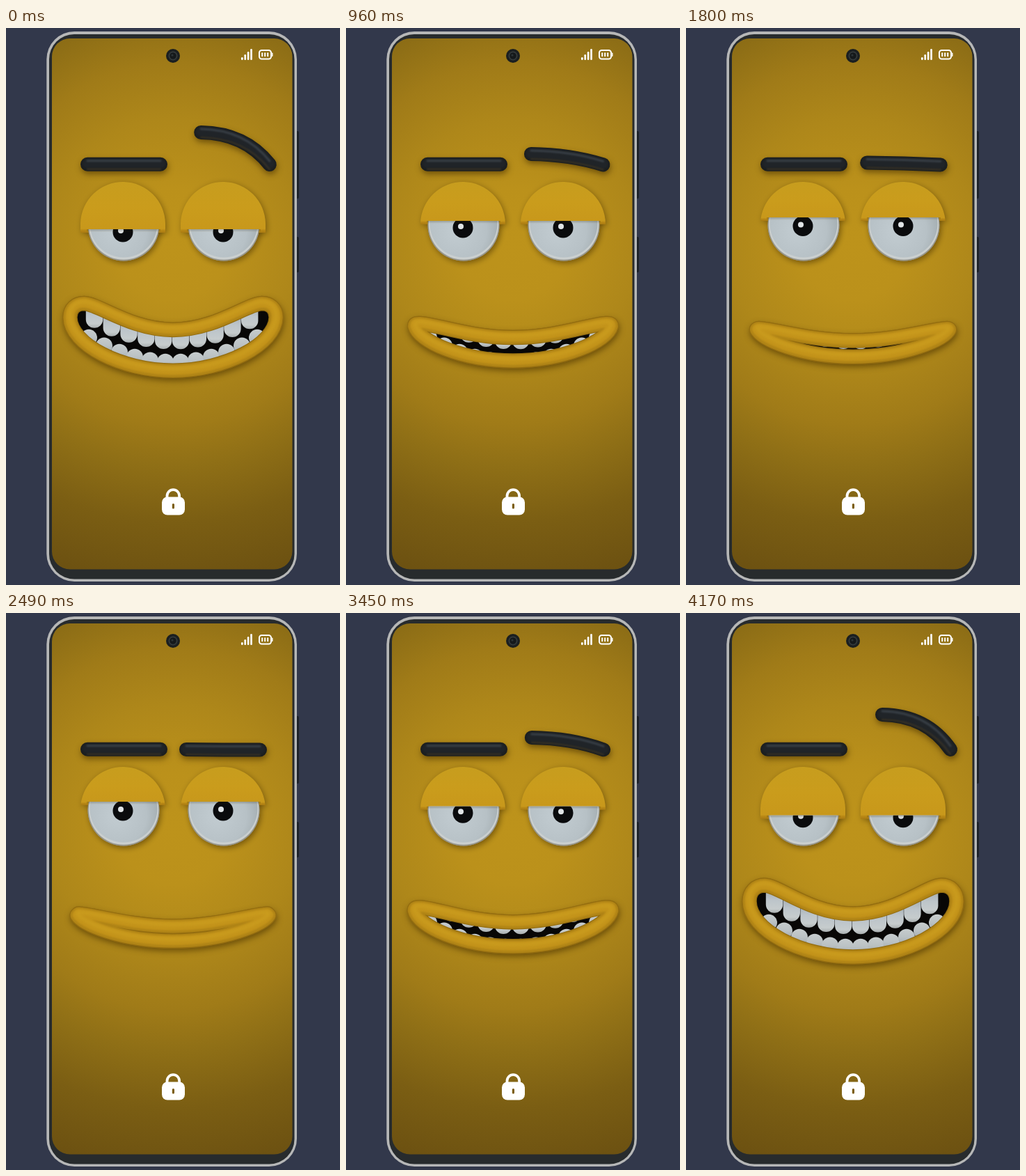
An HTML page with a canvas for the animation above (4200 ms loop, 480x800 px).

```html
<!DOCTYPE html>
<html lang="en">
<head>
<meta charset="utf-8">
<title>Smirking lock screen</title>
<style>
html, body { margin: 0; width: 100%; height: 100%; overflow: hidden; background: #32384b; }
canvas { display: block; width: 480px; height: 800px; }
</style>
</head>
<body>
<canvas id="stage" width="480" height="800"></canvas>
<script>
const ctx = document.getElementById('stage').getContext('2d');
const LOOP = 4200, STEP = 30;

// [time in ms, how far the grin is open]
const GRIN = [
  [0, .92], [250, .9], [480, .82], [720, .58], [960, .3], [1200, .16], [1500, .09],
  [1800, .05], [2490, 0], [2900, .01], [3240, .08], [3450, .34], [3620, .7],
  [3810, .92], [4170, 1]
];

const mix = (a, b, k) => a + (b - a) * k;
const mixPt = (a, b, k) => a.map((v, i) => mix(v, b[i], k));

// Monotone cubic interpolation through the table
const rise = i => (GRIN[i + 1][1] - GRIN[i][1]) / (GRIN[i + 1][0] - GRIN[i][0]);
function slope(i) {
  if (i === 0 || i === GRIN.length - 1) return 0;
  const a = rise(i - 1), b = rise(i);
  return a * b > 0 ? 2 * a * b / (a + b) : 0;
}
function grinAt(t) {
  const last = GRIN.length - 1;
  if (t >= GRIN[last][0]) return GRIN[last][1];
  let i = 0;
  while (t >= GRIN[i + 1][0]) i++;
  const [t0, p0] = GRIN[i], [t1, p1] = GRIN[i + 1];
  const h = t1 - t0, u = (t - t0) / h, v = 1 - u;
  return p0 * (1 + 2 * u) * v * v + p1 * u * u * (3 - 2 * u)
    + h * u * v * (slope(i) * v - slope(i + 1) * u);
}

function gradient(g, ...stops) {
  for (const [at, color] of stops) g.addColorStop(at, color);
  return g;
}
const vertical = (y0, y1, ...stops) => gradient(ctx.createLinearGradient(0, y0, 0, y1), ...stops);
const radial = (x, y, r0, r1, ...stops) =>
  gradient(ctx.createRadialGradient(x, y, r0, x, y, r1), ...stops);

function shadow(color, blur, dx, dy) {
  ctx.shadowColor = color;
  ctx.shadowBlur = blur;
  ctx.shadowOffsetX = dx;
  ctx.shadowOffsetY = dy;
}
const noShadow = () => shadow('transparent', 0, 0, 0);

function roundBox(x0, y0, x1, y1, r, color) {
  ctx.beginPath();
  ctx.roundRect(x0, y0, x1 - x0, y1 - y0, r);
  ctx.fillStyle = color;
  ctx.fill();
}
function disc(x, y, r, color) {
  ctx.beginPath();
  ctx.arc(x, y, r, 0, 7);
  ctx.fillStyle = color;
  ctx.fill();
}
function line(path, width, color, dy = 0, blur = 0) {
  ctx.save();
  ctx.translate(0, dy);
  if (blur) ctx.filter = `blur(${blur}px)`;
  ctx.lineWidth = width;
  ctx.strokeStyle = color;
  ctx.stroke(path);
  ctx.restore();
}

function phone() {
  ctx.fillStyle = '#32384b';
  ctx.fillRect(0, 0, 480, 800);
  roundBox(414, 148, 421, 245, 2, '#1d2229');
  roundBox(414, 300, 421, 351, 2, '#1d2229');
  roundBox(58.3, 5, 418, 795, 40, '#b6b7b7');
  roundBox(62, 9, 414.5, 791.5, 36, '#272b2d');
}

function wallpaper() {
  ctx.fillStyle = radial(240, 310, 0, 500, [0, '#bd931b'], [.16, '#bb911b'], [.36, '#ae871a'],
    [.52, '#a07b18'], [.64, '#8f6f16'], [.8, '#7b5e13'], [1, '#6b5011']);
  ctx.fillRect(66, 15, 346, 763);
}

function brow(from, bend, to) {
  const path = new Path2D();
  path.moveTo(...from);
  path.quadraticCurveTo(...bend, ...to);
  shadow('#4a3200a0', 8, 1, 4);
  line(path, 20, '#1c1f20');
  noShadow();
  line(path, 14, '#202428', -1, 1);
  line(path, 3, '#383f46', -5, 1.2);
  line(path, 2, '#3a3427', 7, 1);
}

function eye(x, p) {
  const edge = mix(271, 290.7, p), cy = 283;

  shadow('#4a3200a0', 8, 2, 3);
  disc(x + 1, cy, 51.5, '#a5a69d');
  shadow('#4a320080', 9, 2, 2);
  ctx.beginPath();
  ctx.moveTo(x - 61, edge + 5);
  ctx.lineTo(x - 61, Math.min(edge, 281));
  ctx.arc(x, 282, 61, Math.PI + .02, -.02);
  ctx.lineTo(x + 61, edge + 5);
  ctx.closePath();
  ctx.fillStyle = vertical(221, edge + 5, [0, '#c79d1e'], [.5, '#ca9c1c'], [.92, '#c8981b'], [.95, '#b98815'], [1, '#a97a12']);
  ctx.fill();
  noShadow();

  ctx.save();
  ctx.beginPath();
  ctx.rect(x - 70, edge, 140, 80);
  ctx.clip();
  disc(x + 1, cy, 51.5, '#969488');
  disc(x + 1, cy - .5, 50.3, '#cacfcf');
  disc(x + 1, cy - 2, 48.5, radial(x - 8, cy + 8, 8, 60, [0, '#c0cacf'], [.65, '#b7c1c6'], [1, '#a5afb3']));
  const py = mix(284, 293.7, p);
  disc(x, py, 14.5, '#0a0b0d');
  disc(x - 3, py - 2, 4, '#e0e4e6');
  ctx.fillStyle = vertical(edge, edge + 4, [0, '#33280040'], [1, '#33280000']);
  ctx.fillRect(x - 52, edge, 106, 4);
  ctx.restore();
}

// Centre line of the lips, mirrored about x = 240
function lips(p) {
  const top = mix(450, 432, p), low = mix(471, 494, p);
  const peak = [mix(104, 113, p), 432 - 41 * p ** 1.4];
  const side = [mix(102, 91, p), mix(434, 414, p)];
  const cheek = mixPt([110, 447], [91, 455], p);
  const left = [
    [240, low], [165, low], cheek, side,
    [side[0], side[1] - 14 * p], [peak[0] - 13 * p, peak[1]], peak,
    [peak[0] + 22, peak[1] + 1], [180, top], [240, top]
  ];
  const right = left.map(([x, y]) => [480 - x, y]).reverse();
  const path = new Path2D();
  path.moveTo(240, low);
  for (const half of [left, right])
    for (let i = 1; i < 10; i += 3) path.bezierCurveTo(...half[i], ...half[i + 1], ...half[i + 2]);
  path.closePath();
  return path;
}

function teeth() {
  for (let i = 0; i < 12; i++) {
    const x = 119 + 22 * i, y = 468 - .0024 * (x - 240) ** 2;
    disc(x, y + 12, 12, vertical(y, y + 24, [0, '#c6cccd'], [.5, '#bac1c3'], [1, '#a0a7aa']));
  }
  for (let i = 0; i < 10; i++) {
    const x = 127 + 24.8 * i, y = 461.5 - .0024 * (x - 240) ** 2;
    roundBox(x - 12.2, y - 44, x + 12.2, y, 12,
      vertical(y - 30, y, [0, '#a9b1b6'], [.4, '#bdc5ca'], [.8, '#c6cccd'], [1, '#a9afb0']));
  }
}

function mouth(p) {
  const path = lips(p);
  shadow('#4a3200a0', 9, 1, 4);
  line(path, 21.5, '#946d10');
  noShadow();
  ctx.save();
  ctx.clip(path);
  ctx.fillStyle = '#080706';
  ctx.fillRect(80, 380, 320, 130);
  teeth();
  ctx.restore();
  line(path, 21.5, '#946d10');
  line(path, 19, '#b08416');
  line(path, 13, '#c3931a', -.5, 1.3);
  line(path, 5, '#ca9c1e', -2.5, 2);
}

function icons() {
  disc(240, 40, 10, '#1b1f20');
  disc(240, 40, 6.5, '#353b3d');
  disc(240, 40, 4.8, '#15191b');
  disc(239, 39, 1.6, '#2c3436');

  for (let i = 0; i < 4; i++) {
    const x = 338 + 4.4 * i;
    roundBox(x, 42 - 4 * i, x + 2.6, 46, 1.2, '#fff');
  }
  ctx.strokeStyle = '#fff';
  ctx.lineWidth = 2;
  ctx.beginPath();
  ctx.roundRect(364, 32, 17, 12.5, 3.5);
  ctx.stroke();
  for (const x of [367.2, 371.2, 375.2]) roundBox(x, 35.3, x + 2, 41.3, 1, '#fff');
  roundBox(381.5, 35.5, 383.5, 41, 1, '#fff');

  ctx.lineWidth = 3.8;
  ctx.beginPath();
  ctx.moveTo(231.5, 676);
  ctx.lineTo(231.5, 672);
  ctx.arc(240.3, 672, 8.8, Math.PI, 0);
  ctx.lineTo(249.1, 676);
  ctx.stroke();
  roundBox(224, 673.5, 257, 699.5, 8, '#fff');
  roundBox(238.8, 683, 242, 690.5, 1.5, '#7c5e13');
}

function draw(t) {
  const p = grinAt(t);
  phone();
  ctx.save();
  ctx.beginPath();
  ctx.roundRect(66, 15, 345.5, 762.5, 26);
  ctx.clip();
  wallpaper();
  ctx.lineCap = ctx.lineJoin = 'round';
  brow([117, 195.7], [170, 195.7], [222, 195.7]);
  brow(mixPt([259, 196], [282, 146], p), mixPt([312, 196.5], [346, 147], p), mixPt([365, 196.5], [380, 196], p));
  eye(168, p);
  eye(312, p);
  mouth(p);
  ctx.lineCap = 'butt';
  icons();
  ctx.restore();
}

const start = performance.now();
function tick() {
  const t = (performance.now() - start) % LOOP;
  draw(Math.floor(t / STEP) * STEP);
  requestAnimationFrame(tick);
}
tick();
</script>
</body>
</html>
```
